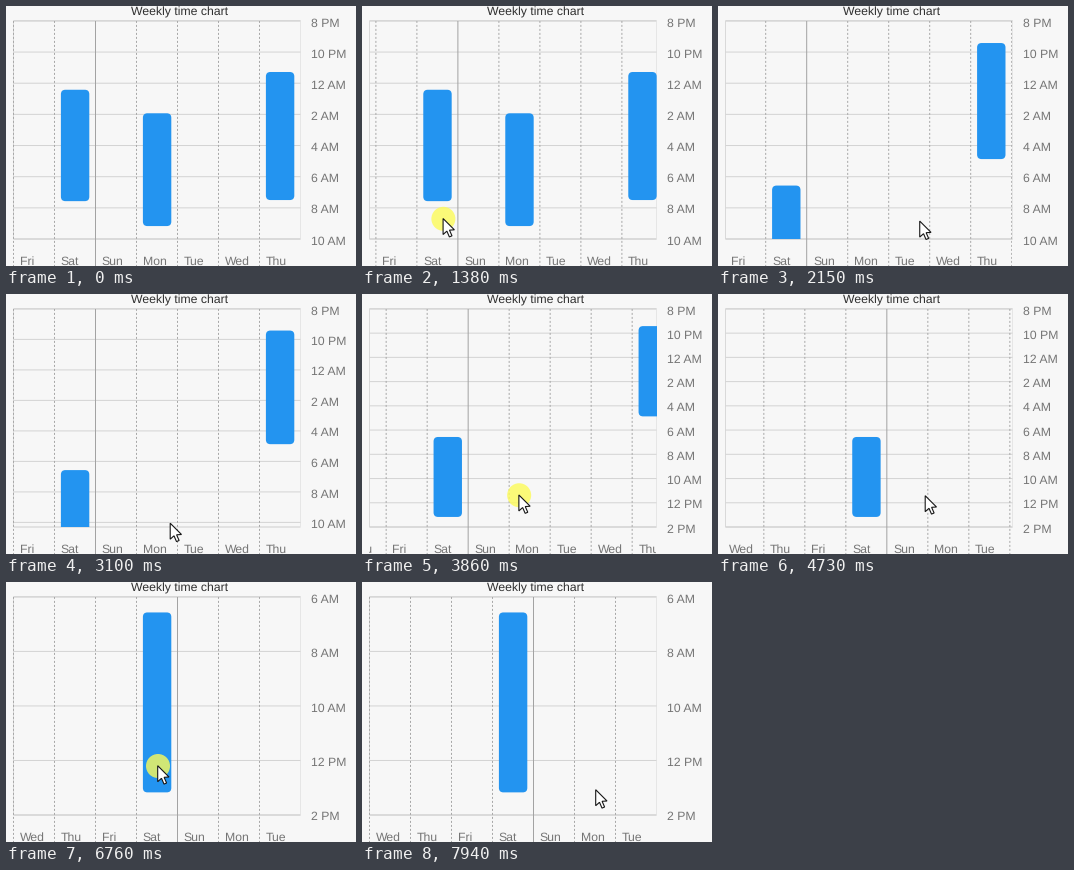
A matplotlib script for the animation above (8 s loop, 350 px wide and 260 px high).

```python
import math

import matplotlib.pyplot as plt
import numpy as np
from matplotlib.animation import FuncAnimation
from matplotlib.patches import Circle, FancyBboxPatch, Polygon, Rectangle

plt.rcParams["font.family"] = "Liberation Sans"
plt.rcParams["text.hinting"] = "no_hinting"

W, H, DPI = 350, 260, 100
STEP, LOOP = 40, 8000
LEFT, PITCH = 7.5, 41
RIGHT = LEFT + 7 * PITCH
TOP, BOTTOM = 14.9, 233
PX = 72 / DPI
DAYS = ["Fri", "Sat", "Sun", "Mon", "Tue", "Wed", "Thu"]

# column, start hour, end hour (20 = 8 PM, 24 = midnight)
BARS = [(1, 24.42, 31.57), (3, 25.93, 33.17), (6, 23.28, 31.5),
        (-1, 21.42, 28.87), (-6, 30.57, 37.17)]
BAR_INSET, BAR_WIDTH = 6.4, 28.4


def smooth(u):
    return u * u * (3 - 2 * u)


def quad(u):
    return u * u


def sine(u):
    return math.sin(u * math.pi / 2)


_s = np.linspace(0, 1, 200)
_bx = 0.75 * _s * (1 - _s) ** 2 + 0.75 * _s ** 2 * (1 - _s) + _s ** 3
_by = 0.3 * _s * (1 - _s) ** 2 + 3 * _s ** 2 * (1 - _s) + _s ** 3


def ease(u):
    return float(np.interp(u, _bx, _by))


def part(t, t0, t1):
    return min(max((t - t0) / (t1 - t0), 0), 1)


# pointer path: start time, end time, x, y, easing
MOVES = [
    (130, 440, 217, 225, smooth),
    (850, 1230, 75, 213, smooth),
    (1340, 1530, 219, 209, quad),
    (2010, 2360, 164.5, 229.5, smooth),
    (3300, 3700, 140.5, 201, smooth),
    (3780, 4280, 207.5, 202, sine),
    (4780, 5020, 221, 242, smooth),
    (5950, 6500, 152, 184, smooth),
    (7080, 7390, 215, 216, smooth),
    (7850, 7940, 234, 208, sine),
]


def pointer(t):
    x, y = 277, 250
    for t0, t1, nx, ny, curve in MOVES:
        if t <= t0:
            break
        u = curve(part(t, t0, t1))
        x, y = x + (nx - x) * u, y + (ny - y) * u
    return x, y


def scroll(t):
    """Drag with the pointer, then glide to a whole column."""
    week, two = 7 * PITCH, 2 * PITCH
    if t < 1530:
        return 144 * quad(part(t, 1340, 1530))
    if t < 3780:
        return week - (week - 144) * math.exp(-(t - 1530) / 118)
    if t < 4550:
        return week + 67 * sine(part(t, 3780, 4280))
    return week + two - (two - 67) * math.exp(-(t - 4550) / 110)


def scale(t):
    """Anchor hour, its y, and pixels per hour."""
    span = BOTTOM - TOP
    h14, h18, h8 = span / 14, span / 18, span / 8
    if t < 5870:
        u = ease(part(t, 3030, 3730)) if t > 3090 else 0
        return 20, TOP, h14 + (h18 - h14) * u
    return 38, BOTTOM, h18 + (h8 - h18) * ease(part(t, 5826, 6526))


def hour_name(h):
    return f"{h % 12 or 12} {'AM' if h % 24 < 12 else 'PM'}"


fig = plt.figure(figsize=(W / DPI, H / DPI), dpi=DPI, facecolor="#f7f7f7")
ax = fig.add_axes([0, 0, 1, 1])
ax.set_xlim(0, W)
ax.set_ylim(H, 0)
ax.axis("off")

plot_area = Rectangle((LEFT, TOP), RIGHT - LEFT, BOTTOM - TOP,
                      transform=ax.transData)
day_area = Rectangle((LEFT - 0.5, TOP), RIGHT - LEFT, H - TOP,
                     transform=ax.transData)


def line(xs, ys, color, z, **kw):
    return ax.plot(xs, ys, color=color, lw=PX, zorder=z, snap=False,
                   solid_capstyle="butt", dash_capstyle="butt", **kw)[0]


def label(x, y, s, color="#757575", size=12.2, z=4, **kw):
    return ax.text(x, y, s, color=color, fontsize=size * PX, zorder=z,
                   va="baseline", **kw)


label(173.7, 9.5, "Weekly time chart", "#303030", ha="center")
for y in (TOP, BOTTOM):
    line([LEFT, RIGHT], [y, y], "#cfcfcf", 1)
for x, shade in ((LEFT, "#d9d9d9"), (RIGHT, "#e6e6e6")):
    line([x, x], [TOP, BOTTOM], shade, 1)

hours = []
for h in range(20, 40, 2):
    hours.append((h, line([LEFT, RIGHT], [0, 0], "#d4d4d4", 1),
                  label(305, 0, hour_name(h))))

days = []
for k in range(-10, 8):
    sunday = k % 7 == 2
    rule = line([0, 0], [TOP, H], "#a3a3a3" if sunday else "#a8a8a8", 2,
                linestyle="-" if sunday else (0, (2, 2)))
    name = label(0, 259, DAYS[k % 7], clip_on=True)
    for item in (rule, name):
        item.set_clip_path(day_area)
    days.append((k, rule, name))

bars = []
for k, start, end in BARS:
    bar = FancyBboxPatch((0, 0), BAR_WIDTH, 50, color="#2394f0", lw=0,
                         zorder=3, boxstyle="round,pad=0,rounding_size=4.5")
    ax.add_patch(bar)
    bar.set_clip_path(plot_area)
    bars.append((k, start, end, bar))

# detail card beside the tapped bar
card = []


def card_box(grow, color, alpha):
    box = FancyBboxPatch((174 - grow, 68 - grow), 116 + 2 * grow,
                         104 + 2 * grow, fc=color, ec="none", zorder=5,
                         boxstyle=f"round,pad=0,rounding_size={6 + grow}")
    ax.add_patch(box)
    card.append((box, alpha))


for grow in (7, 5, 3, 1):
    card_box(grow, "black", 0.025)
card_box(0, "white", 1)
for y, s, size in ((106, "6 hr 36 min", 15), (129, "6:34 AM -", 12.2),
                   (146, "1:10 PM", 12.2)):
    card.append((label(186, y, s, "#555555", size, 6), 1))

halo = ax.add_patch(Circle((0, 0), 12, fc="#fdfb58", ec="none", zorder=8))
ARROW = np.array([(0, 0), (0, 16), (3.8, 12.6), (6.3, 18.4), (8.9, 17.3),
                  (6.4, 11.6), (11.3, 11.3)])
arrow = ax.add_patch(Polygon(ARROW, fc="white", ec="#151515", lw=1.1 * PX,
                             joinstyle="miter", zorder=9))


def draw(i):
    t = i * STEP + STEP / 2

    hour0, y0, per_hour = scale(t)

    def y_at(h):
        return y0 + (h - hour0) * per_hour

    for h, rule, name in hours:
        y = y_at(h)
        shown = TOP - 1 < y < BOTTOM + 1
        rule.set_ydata([y, y])
        name.set_y(y + 5.5)
        rule.set_visible(shown)
        name.set_visible(shown)

    shift = LEFT + scroll(t)
    for k, rule, name in days:
        x = shift + k * PITCH
        rule.set_xdata([x, x])
        name.set_x(x + 6.3)
        rule.set_visible(LEFT - 0.5 <= x < RIGHT - 0.5)
        name.set_visible(LEFT - PITCH < x < RIGHT)

    for k, start, end, bar in bars:
        x = shift + k * PITCH + BAR_INSET
        top = y_at(start)
        bar.set_bounds(x, top, BAR_WIDTH, y_at(end) - top)
        bar.set_visible(LEFT - BAR_WIDTH < x < RIGHT)

    fade = np.interp(t, [6925, 6930, 7600, 7700], [0, 1, 1, 0])
    for item, alpha in card:
        item.set_alpha(alpha * fade)
        item.set_visible(fade > 0)

    x, y = pointer(t)
    press = np.interp(t, [590, 700, 1560, 1640, 3720, 3760, 4550, 4600,
                          6750, 6760, 6920, 6925],
                      [0, 1, 1, 0, 0, 1, 1, 0, 0, 1, 1, 0])
    halo.set_center((x, y))
    halo.set_alpha(0.8 * press)
    arrow.set_xy(ARROW + (x - 0.3, y - 0.3))
    arrow.set_visible(t >= 130)
    return []


anim = FuncAnimation(fig, draw, frames=LOOP // STEP, interval=STEP,
                     init_func=lambda: draw(0), repeat=True, repeat_delay=0)
plt.show()
```
